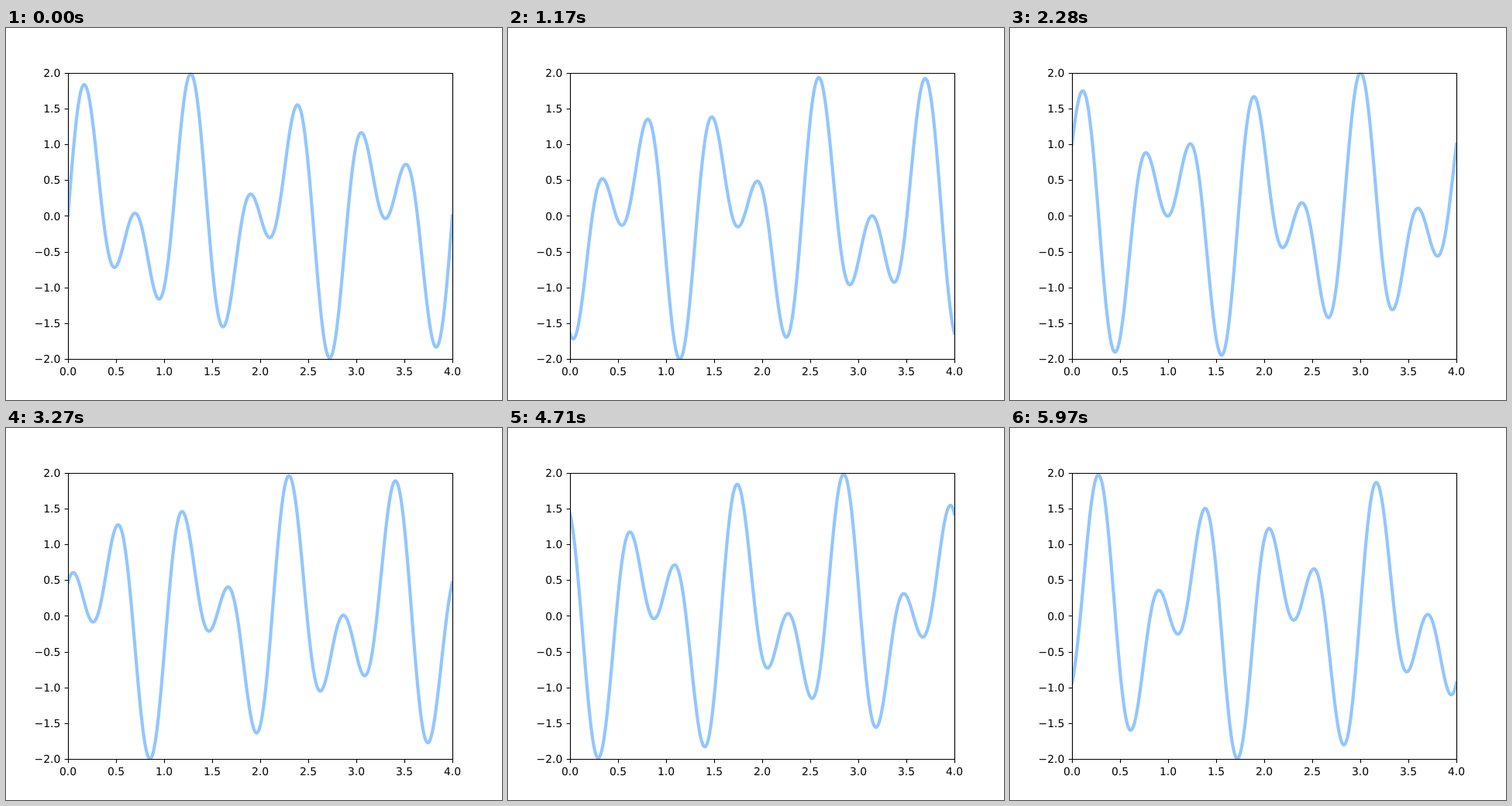
An HTML page for the animation above (6 s loop, 640 px wide and 480 px high).

```html
<!DOCTYPE html>
<html lang="en">
<head>
<meta charset="utf-8">
<title>Two travelling sine waves</title>
<style>
  html, body { margin: 0; width: 100%; height: 100%; overflow: hidden; background: #fff; }
  svg { display: block; width: 640px; height: 480px; }
  text { font: 13.89px "DejaVu Sans", Verdana, sans-serif; text-rendering: geometricPrecision; }
  .x { text-anchor: middle; }
  .y { text-anchor: end; }
  #axes { fill: none; stroke: #000; stroke-width: 1.11; }
  #wave { fill: none; stroke: #92c6ff; stroke-width: 4.17; stroke-linejoin: round; stroke-linecap: square; }
</style>
</head>
<body>
<svg viewBox="0 0 640 480">
  <clipPath id="plot"><rect x="80" y="57.6" width="496" height="369.6"/></clipPath>
  <g clip-path="url(#plot)"><path id="wave"/></g>
  <path id="axes"/>
  <g id="labels"></g>
</svg>
<script>
const STEP = 30, STEPS = 200, SAMPLES = 1000, TAU = 2 * Math.PI;
const start = performance.now();

const wave = document.getElementById("wave");
const axes = document.getElementById("axes");
const labels = document.getElementById("labels");

const px = x => 80 + 124 * x;
const py = y => 242.4 - 92.4 * y;
const snap = v => Math.floor(v + 0.5) + 0.5;

function addLabel(cls, x, y, value) {
  const el = document.createElementNS("http://www.w3.org/2000/svg", "text");
  el.setAttribute("class", cls);
  el.setAttribute("x", x);
  el.setAttribute("y", y);
  el.textContent = value.toFixed(1).replace("-", "\u2212");
  labels.append(el);
}

function drawAxes() {
  let d = "M80.5 58.5H576.5V427.5H80.5Z";
  for (let i = 0; i <= 8; i++) {
    const x = px(i / 2), y = py(i / 2 - 2);
    d += `M${snap(x)} 427.5v4.86M80.5 ${snap(y)}h-4.86`;
    addLabel("x", x, 448, i / 2);
    addLabel("y", 70.3, Math.round(y + 5.2), i / 2 - 2);
  }
  axes.setAttribute("d", d);
}

// The slow wave drifts 0.01 per step; the fast one moves a whole unit.
function height(x, i) {
  return Math.sin(TAU * (x - 0.01 * i)) + Math.sin(TAU * 1.75 * (x - i));
}

function drawWave(i) {
  const points = [];
  for (let k = 0; k <= SAMPLES; k++) {
    const x = 4 * k / SAMPLES;
    points.push(px(x).toFixed(2) + " " + py(height(x, i)).toFixed(2));
  }
  wave.setAttribute("d", "M" + points.join("L"));
}

let shown = -1;
function tick() {
  const i = Math.floor((performance.now() - start) / STEP + 1e-6) % STEPS;
  if (i !== shown) drawWave(shown = i);
  requestAnimationFrame(tick);
}

drawAxes();
tick();
</script>
</body>
</html>
```
